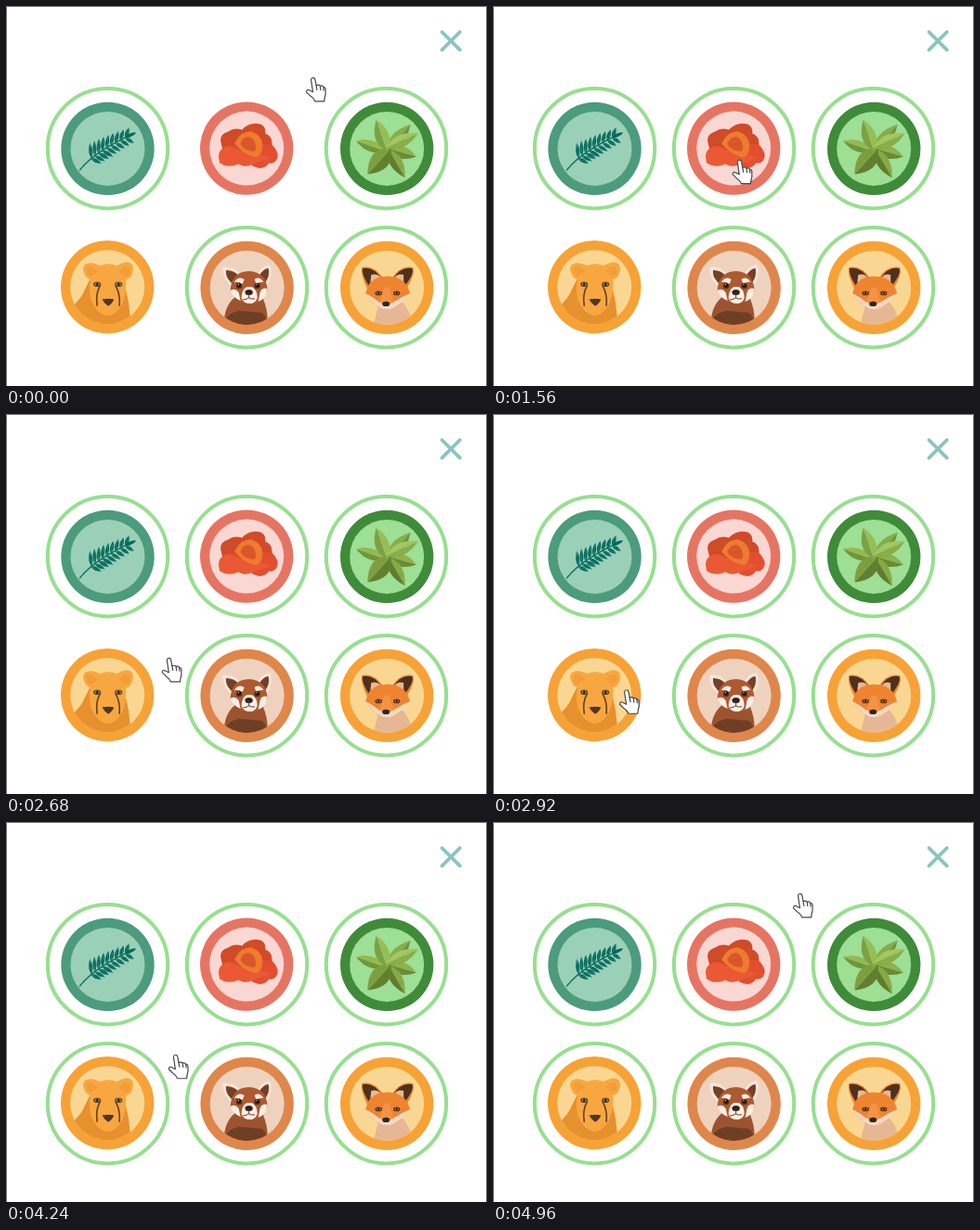
Recreate the animation shown at these times as an HTML page. Size 518 px wide and 410 px high, loop 5000 ms.

```html
<!DOCTYPE html>
<html lang="en">
<head>
<meta charset="utf-8">
<style>
  html, body { margin: 0; width: 100%; height: 100%; overflow: hidden; background: #fff; }
  svg { display: block; width: 518px; height: 410px; }
</style>
</head>
<body>
<svg id="stage" viewBox="0 0 518 410" xmlns="http://www.w3.org/2000/svg"></svg>
<script>
const path = (d, fill, extra = '') => `<path d="${d}" fill="${fill}" ${extra}/>`;
const line = (d, color, width = 1.2) =>
  path(d, 'none', `stroke="${color}" stroke-width="${width}" stroke-linecap="round" stroke-linejoin="round"`);
const oval = (x, y, rx, ry, fill) => `<ellipse cx="${x}" cy="${y}" rx="${rx}" ry="${ry}" fill="${fill}"/>`;

// Pointed leaf lying along x, placed and turned, with separate halves.
function leaf(x, y, angle, length, width, top, bottom = top) {
  const half = w => `M0 0C${length * .25} ${w} ${length * .6} ${w} ${length} 0Z`;
  return `<g transform="translate(${x} ${y}) rotate(${angle})">` +
    path(half(-width), top) + path(half(width), bottom) + '</g>';
}

function fern() {
  const green = '#04695c';
  let out = line('M-30 23Q-13 2 29 -16.5', green, 1.3);
  for (let i = 0; i < 9; i++) {
    const t = .3 + i * .072, u = 1 - t;
    const x = -30 * u * u - 26 * u * t + 29 * t * t;
    const y = 23 * u * u + 4 * u * t - 16.5 * t * t;
    const slope = Math.atan2(-21 * u - 18.5 * t, 17 * u + 42 * t) * 180 / Math.PI;
    out += leaf(x, y, slope - 56 + i * 1.5, 17 - i * .7, 2.6, green) +
      leaf(x, y, slope + 66 - i, 13.5 - Math.abs(i - 3) * .5, 2.6, green);
  }
  return out + leaf(19, -12, -24, 13, 2.4, green);
}

const flower = () =>
  path('M-27 -3Q-31 -15 -20 -18Q-14 -23 -5 -20Q3 -29 15 -26Q21 -23 20 -16Q29 -13 27 0L2 12L-25 4Z', '#d04b28') +
  path('M5 2Q18 -7 28 -3Q37 7 31 14Q28 17 24 16Q18 25 6 19Z', '#e24e2f') +
  path('M-29 16Q-32 5 -27 1Q-19 -6 -9 1Q8 8 25 9Q20 14 9 16Q0 22 -9 17Q-20 22 -29 16Z', '#ea5934') +
  path('M-13 -5Q-7 -19 5 -18Q17 -14 17 -2Q16 11 8 9Q-4 6 -13 -5Z', '#ee7b30') +
  path('M-7 -5Q-3 -14 4 -12Q12 -6 9 3Q-2 4 -7 -5Z', '#d9562a');

const plant = () =>
  leaf(0, 2, -48, 38, 9, '#86ad46', '#6f9439') +
  leaf(-3, 2, 199, 32, 8, '#6f953a', '#94b953') +
  leaf(2, 0, 16, 31, 9, '#8db14c', '#698b34') +
  leaf(2, 1, 60, 35, 9, '#87aa49', '#5f7d2e') +
  leaf(4, 0, 132, 37, 13, '#627f2e', '#7d9d3f') +
  leaf(0, 2, -109, 35, 10, '#7ba142', '#98bd57') +
  leaf(0, -1, -25, 37, 9, '#a3c562', '#88ae48');

const cheetah = () =>
  path('M-42 24Q-29 15 -24 2L-19 -8L18 -3Q24 14 25 42H-42Z', '#e6902e') +
  path('M-25 -15Q-29 -26 -17 -26Q-11 -25 -8 -23Q1 -27 10 -23Q14 -26 21 -27Q30 -26 27 -15Q25 -9 20 -8Q21 10 15 20Q9 30 0 31Q-10 29 -15 19Q-22 8 -18 -8Q-23 -9 -25 -15Z', '#f8a740') +
  path('M-22 -15Q-24 -24 -16 -22L-10 -17L-18 -11ZM24 -15Q26 -24 18 -22L12 -17L20 -11Z', '#f29d38') +
  [-11, 12].map(x => oval(x, -3, 4, 2.8, '#594320') + oval(x, -3, 2.7, 1.9, '#b08a3c') + oval(x, -3, 1.3, 1.6, '#221b12')).join('') +
  line('M-8 -1Q-13 8 -11 20M9 -1Q14 8 13 20', '#604220', 1.6) +
  path('M-5.5 13Q1 12 7 13Q6 17 1 20.5Q-4 17 -5.5 13Z', '#503622');

const redPanda = () =>
  path('M-25 40Q-25 20 -13 10L17 11Q23 25 22 40Z', '#9c5430') +
  path('M-25 40Q-23 27 -8 25L16 27Q22 32 22 42Z', '#6f3f25') +
  path('M-15 0Q-27 -9 -26 -22Q-15 -24 -7 -14ZM10 -14Q17 -25 25 -25Q29 -13 20 0Z', '#f3e5da') +
  path('M-14 -3Q-24 -10 -22.5 -19Q-14 -19 -9 -13ZM13 -13Q18 -21 23 -21Q25 -11 18 -4Z', '#754027') +
  path('M-18 3Q-17 -17 2 -18Q21 -17 22 3Q17 16 3 18Q-11 16 -18 3Z', '#ad5a31') +
  path('M-18 3Q-13 0 -9 5L-7 14Q-15 11 -18 3ZM22 1Q16 -1 14 5L12 15Q21 12 22 1ZM-14 -6Q-9 -13 -3 -9L-5 -4Q-9 -7 -14 -6ZM18 -6Q13 -13 8 -9L10 -4Q14 -7 18 -6Z', '#f8eee5') +
  path('M-6 11Q-6 2 0 -1H5Q11 2 11 11Q9 17 3 17Q-4 17 -6 11Z', '#f8eee5') +
  [-8.5, 11].map(x => oval(x, -2, 3.2, 3.2, '#542e20') + oval(x, -2.5, 1.8, 2, '#17130f') + oval(x - .6, -3.2, .6, .6, '#fff')).join('') +
  oval(2, 5, 4.2, 3, '#30211c') +
  line('M2 7V11Q-1 13 -4 13M2 11Q5 13 8 12', '#66402d', 1);

const fox = () =>
  path('M-15 42L-9 18L15 14Q25 22 28 43Z', '#e5b794') +
  path('M-21 1Q-29 -15 -27 -22Q-14 -25 -4 -10L-10 0ZM21 1Q31 -15 28 -22Q15 -25 5 -10L10 0Z', '#e98230') +
  path('M-20 -3Q-28 -16 -26 -21Q-14 -23 -6 -10ZM20 -3Q30 -16 27 -21Q15 -23 7 -10Z', '#50301f') +
  path('M-18 -3L-17 -14Q-9 -16 -6 -9ZM18 -3L18 -14Q11 -16 7 -9Z', '#e6b893') +
  path('M-23 6Q-20 -8 -9 -11Q0 -14 10 -11Q21 -8 25 6Q18 14 10 20Q0 27 -10 20Q-18 14 -23 6Z', '#ef8430') +
  path('M-23 6Q-15 10 -9 15Q0 20 8 15Q15 10 25 6Q19 14 10 20Q0 27 -10 20Q-18 14 -23 6Z', '#f3d8bf') +
  path('M-8 15Q-4 6 -3 0H3Q4 6 7 15Q0 19 -8 15Z', '#f29442') +
  [-9, 10.5].map(x => oval(x, 6, 3.7, 2.4, '#53351f') + oval(x, 5.8, 2, 1.5, '#d39b43') + oval(x, 5.8, 1.1, 1.4, '#1c1712')).join('') +
  oval(-1, 17.5, 4, 2.6, '#302622');

const badges = [
  [109.5, 153.9, '#4c9b7d', '#9bd0b8', fern],
  [259.2, 153.6, '#e57562', '#f9d7d3', flower],
  [410.2, 153.9, '#3f8b3a', '#9cdf95', plant],
  [109.2, 303.2, '#f7a236', '#f9d793', cheetah],
  [259.6, 303.9, '#df864b', '#efd2be', redPanda],
  [410.2, 303.9, '#f7a236', '#f9d793', fox],
];

const ring = (x, y, i) =>
  `<circle id="ring${i}" cx="${x}" cy="${y}" r="64.7" fill="none" stroke="#97df8f" stroke-width="4"/>`;

const badge = ([x, y, rim, back, art], i) =>
  ring(i % 3 * 150 + 109.5, i < 3 ? 153.7 : 303.7, i) +
  `<g transform="translate(${x} ${y})"><circle r="50.2" fill="${rim}"/><circle r="40" fill="${back}"/>
   <g clip-path="url(#inner)">${art()}</g></g>`;

const hand =
  path('M-2 2Q-1.7 0 .2 0Q2 0 2.4 2L3.6 8.4Q6 7 7.8 8.9Q10.5 8 11.3 10.2Q13.6 10 13.6 13V18Q12.3 22 12.3 25.5H2.3Q1 22 -3 19.5L-7 15.5Q-7 12.3 -3.8 13.5L0 15.5Z',
    '#fff', 'stroke="#484848" stroke-width="1.2" stroke-linejoin="round"') +
  line('M3.6 8.4L4.4 13M7.8 9L8.3 13.3M11.3 10.2L11.7 13.8', '#484848', 1.2);

const stage = document.getElementById('stage');
stage.innerHTML = `<clipPath id="inner"><circle r="40"/></clipPath>
  <path d="M.5 410V.5H517.5V410" fill="none" stroke="#747474"/>
  ${line('M469.5 28L488.8 47.3M488.8 28L469.5 47.3', '#8bc4be', 3.8)}
  ${badges.map(badge).join('')}
  <g id="cursor">${hand}</g>`;

const cursor = document.getElementById('cursor');
const flowerRing = document.getElementById('ring1');
const cheetahRing = document.getElementById('ring3');

// Pointer stops: time, x, y
const stops = [
  [0, 330.5, 77.3], [320, 330.5, 77.3], [1000, 265.2, 166.2], [2000, 265.2, 166.2],
  [3000, 133, 309.2], [4000, 133, 309.2], [4960, 330.5, 77.3], [5000, 330.5, 77.3],
];

function draw(time) {
  const t = Math.floor(time % 5000 / 40) * 40;
  const next = stops.findIndex(stop => stop[0] > t);
  const [t0, x0, y0] = stops[next - 1], [t1, x1, y1] = stops[next];
  const k = (t - t0) / (t1 - t0);
  cursor.setAttribute('transform', `translate(${x0 + (x1 - x0) * k} ${y0 + (y1 - y0) * k})`);
  flowerRing.style.display = t >= 1560 ? '' : 'none';
  cheetahRing.style.display = t >= 3520 ? '' : 'none';
}

const start = performance.now();
function tick() {
  draw(performance.now() - start);
  requestAnimationFrame(tick);
}
tick();
</script>
</body>
</html>
```
